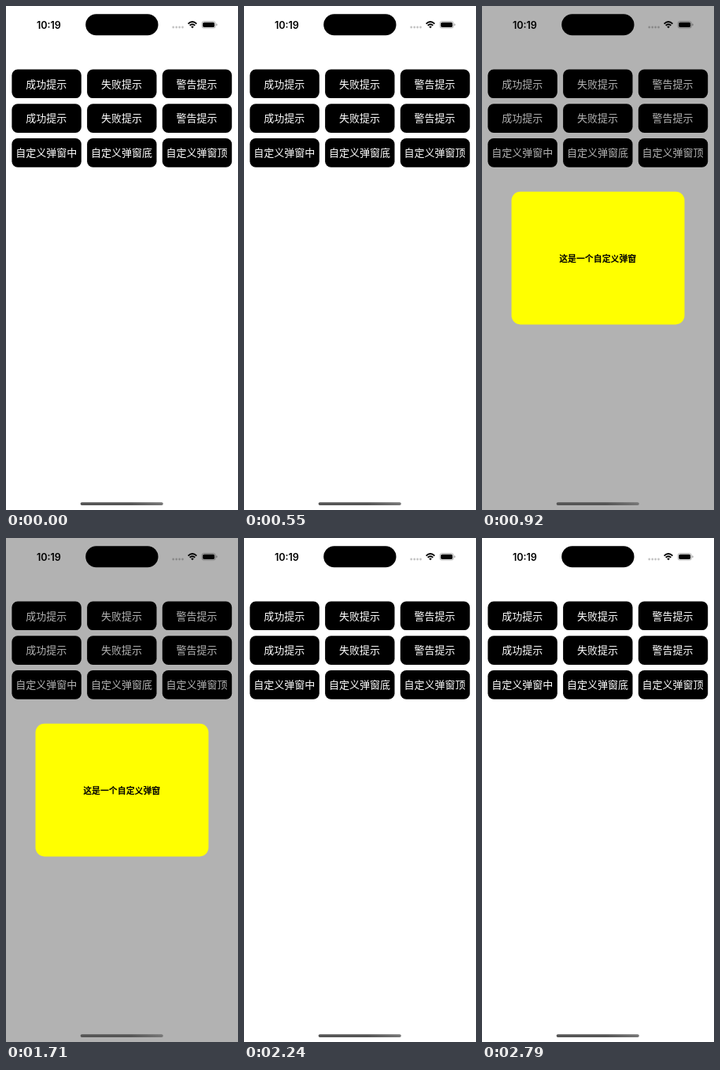
Write an HTML page that moves like this. It is 295 px wide and 640 px high and loops after 3160 ms.

```html
<!DOCTYPE html>
<html lang="zh-CN">
<head>
<meta charset="utf-8">
<style>
  html, body { margin: 0; width: 100%; height: 100%; overflow: hidden; background: #fff; }
  svg { display: block; width: 295px; height: 640px; }
  text { font-family: "Noto Sans CJK SC", "Noto Sans CJK", sans-serif; text-anchor: middle; }
  .label { font-size: 13px; fill: #fff; }
  .message { font-size: 10.9px; font-weight: 700; }
  .clock { font: 600 12.6px Inter, sans-serif; }
</style>
</head>
<body>
<svg viewBox="0 0 295 640">
  <rect width="295" height="640" fill="#fff"/>
  <g id="buttons"></g>
  <g fill="#c4c4c4">
    <circle cx="212.7" cy="27" r="1.4"/><circle cx="216.7" cy="27" r="1.4"/>
    <circle cx="220.6" cy="27" r="1.4"/><circle cx="224.5" cy="27" r="1.4"/>
  </g>
  <g id="popup" visibility="hidden">
    <rect width="295" height="640" opacity=".3"/>
    <rect x="37.5" y="235.7" width="220" height="168.7" rx="11.3" fill="#ff0"/>
    <text class="message" x="147.2" y="324.9">这是一个自定义弹窗</text>
  </g>
  <text class="clock" x="54.4" y="28.6">10:19</text>
  <rect x="101.2" y="10.2" width="92.3" height="27" rx="13.5"/>
  <g fill="none" stroke="#000" stroke-width="1.9">
    <path d="M231.6 22.6Q237 17.6 242.4 22.6M233.7 24.8Q237 21.9 240.3 24.8"/>
    <path d="M235.2 26.3Q237 24.9 238.8 26.3L237 28.2Z" fill="#000" stroke="none"/>
  </g>
  <rect x="249" y="19.5" width="17.4" height="8.6" rx="2.7" fill="none" stroke="#000" stroke-opacity=".35" stroke-width=".8"/>
  <rect x="250.2" y="20.7" width="15" height="6.2" rx="1.7"/>
  <path d="M267.4 22.3q1.3.4 1.3 1.5t-1.3 1.5z" opacity=".4"/>
  <linearGradient id="shine">
    <stop offset=".6" stop-color="#555"/><stop offset="1" stop-color="#777"/>
  </linearGradient>
  <rect x="94.6" y="630.2" width="105.2" height="3.8" rx="1.9" fill="url(#shine)"/>
</svg>
<script>
  const tips = ["成功提示", "失败提示", "警告提示"];
  const rows = [tips, tips, ["自定义弹窗中", "自定义弹窗底", "自定义弹窗顶"]];
  document.getElementById("buttons").innerHTML = rows.map((row, r) => row.map((label, c) => {
    const x = 7.4 + c * 95.7, y = 80.5 + r * 43.8;
    return `<rect x="${x}" y="${y}" width="88.4" height="36.6" rx="7.5"/>
      <text class="label" x="${x + 43.8}" y="${y + 23}">${label}</text>`;
  }).join("")).join("");

  const popup = document.getElementById("popup");
  function draw(now) {
    const t = now % 3160;
    popup.setAttribute("visibility", t >= 920 && t < 2240 ? "visible" : "hidden");
    requestAnimationFrame(draw);
  }
  draw(performance.now());
</script>
</body>
</html>
```
